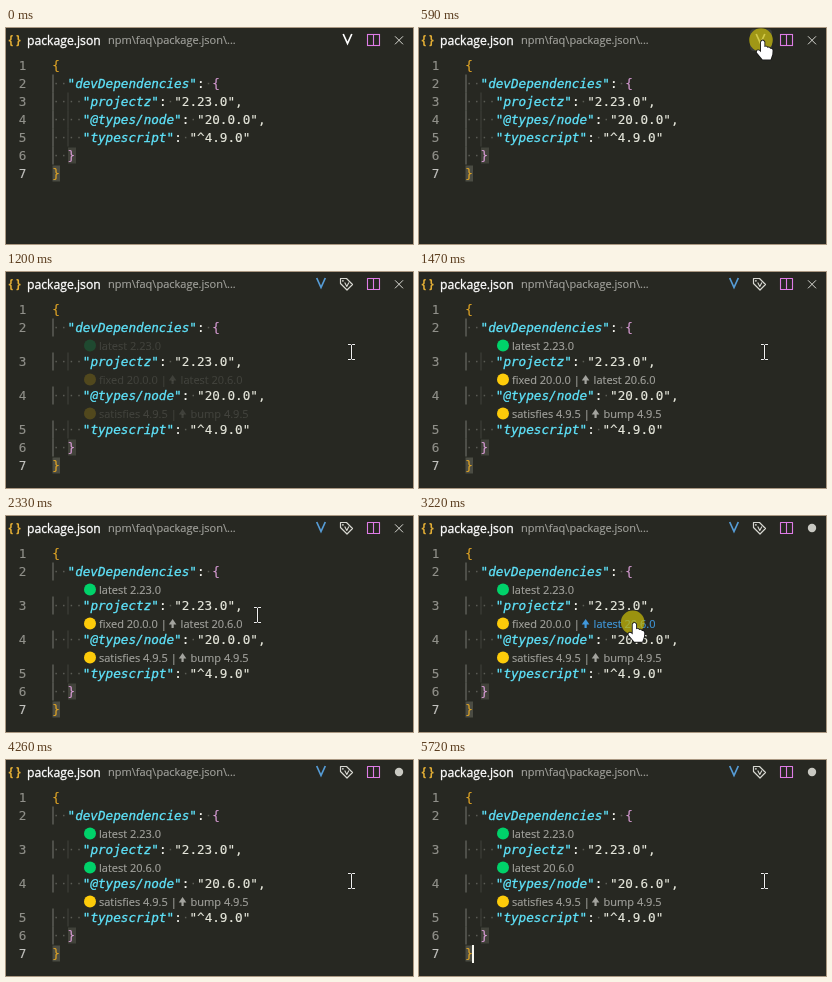
Recreate the animation shown at these times as an HTML page with a canvas. Size 407 px wide and 216 px high, loop 6.04 s.

```html
<!DOCTYPE html>
<html lang="en">
<head>
<meta charset="utf-8">
<title>Dependency versions in an editor</title>
<style>
html, body { margin: 0; width: 100%; height: 100%; overflow: hidden; background: #272822; }
canvas { display: block; width: 407px; height: 216px; }
</style>
</head>
<body>
<canvas id="stage"></canvas>
<script>
const W = 407, H = 216, LOOP = 6040;
const canvas = document.getElementById('stage');
const ctx = canvas.getContext('2d');
const scale = window.devicePixelRatio || 1;
canvas.width = W * scale;
canvas.height = H * scale;

const UI = '"Open Sans", "Noto Sans", sans-serif';
const MONO = '12.65px "DejaVu Sans Mono", monospace';
const LEFT = 46.3, COL = 7.617;
const C = {
  bg: '#272822', key: '#5fe3fb', value: '#e6e7dc', plain: '#f8f8f2', dim: '#a3a39e',
  gold: '#e0a526', orchid: '#d59ad2', dot: '#5b5c55', guide: '#767771', link: '#4098dc',
  green: '#00d26a', yellow: '#fdcb0a', split: '#de7ce6', icon: '#d8d8d2'
};

// Event times in ms
const TOGGLED = 730, SHIFTED = 1060, LENS_IN = 1135, LENS_FULL = 1470;
const EDITED = 3220, LENS_NEW = 3620;
const CLICKS = [[530, 670], [EDITED, 3290]];
const CARET_ON = [[730, 1200], [1700, 2200], [2740, 3220], [3750, 4260], [4730, 5250], [5720, LOOP]];
const within = (t, spans) => spans.some(([a, b]) => t >= a && t < b);

// Pointer moves: start, end, destination, ease-out power
const MOVES = [
  [70, 500, 342, 12, 1.5],
  [670, 1060, 345, 79.5, 2],
  [1940, 2600, 213.7, 106.3, 1.35],
  [3620, 4130, 344.5, 121, 1.5]
];

function pointerAt(t) {
  const step = Math.floor((t + 15) / 66.9) * 66.9;
  let x = 362, y = 194;
  for (const [a, b, tx, ty, power] of MOVES) {
    const u = Math.min(1, Math.max(0, (step - a) / (b - a)));
    const k = 1 - Math.pow(1 - u, power);
    x += (tx - x) * k;
    y += (ty - y) * k;
  }
  return { x, y };
}

// A non-zero weight thickens the glyphs slightly
function text(str, x, y, font, color, weight = 0) {
  ctx.font = font;
  ctx.fillStyle = color;
  ctx.fillText(str, x, y);
  if (weight) {
    ctx.strokeStyle = color;
    ctx.lineWidth = weight;
    ctx.strokeText(str, x, y);
  }
  return x + ctx.measureText(str).width;
}

function disc(x, y, r, color) {
  ctx.fillStyle = color;
  ctx.beginPath();
  ctx.arc(x, y, r, 0, Math.PI * 2);
  ctx.fill();
}

function rect(x, y, w, h, color) {
  ctx.fillStyle = color;
  ctx.fillRect(x, y, w, h);
}

function line(points, color, width = 1, close = false) {
  ctx.strokeStyle = color;
  ctx.lineWidth = width;
  ctx.beginPath();
  points.forEach(([x, y]) => ctx.lineTo(x, y));
  if (close) ctx.closePath();
  ctx.stroke();
}

const code = (str, col, y, color, italic) =>
  text(str, LEFT + col * COL, y + 4.5, (italic ? 'italic ' : '') + MONO, color, italic ? 0.3 : 0.15);

function spaceDots(from, to, y) {
  for (let c = from; c < to; c++) rect(LEFT + (c + 0.5) * COL - 0.7, y - 0.7, 1.5, 1.5, C.dot);
}

function entry(key, value, y) {
  const name = `"${key}"`, mid = 4 + name.length;
  spaceDots(0, 4, y);
  code(name, 4, y, C.key, true);
  code(':', mid, y, C.plain);
  spaceDots(mid + 1, mid + 2, y);
  code(value, mid + 2, y, C.value);
}

function drawTabs() {
  const brace = `bold 12px ${UI}`;
  text('{', 2.5, 15.5, brace, '#e3ae35');
  text('}', 10, 15.5, brace, '#e3ae35');
  text('package.json', 21, 16.5, `12.2px ${UI}`, '#ffffff', 0.3);
  text('npm\\faq\\package.json\\...', 102, 16, `11px ${UI}`, C.dim, 0.15);
}

function drawTag(x, y) {
  ctx.lineJoin = 'round';
  line([[x - 6, y - 5.5], [x, y - 5.5], [x + 6, y + 0.5], [x + 0.5, y + 6], [x - 6, y - 0.5]], C.icon, 1.2, true);
  disc(x - 3.6, y - 3.2, 0.9, C.icon);
  line([[x - 1.8, y - 1.5], [x + 0.3, y + 2.4], [x + 2.4, y - 1.5]], C.icon, 1.1);
}

function drawToolbar(t, p) {
  const on = t >= TOGGLED;
  if (t >= 70 && p.y < 23 && Math.abs(p.x - 342) < 12) {
    ctx.fillStyle = 'rgba(90,93,94,0.4)';
    ctx.beginPath();
    ctx.roundRect(331, 1, 22, 22, 4);
    ctx.fill();
  }
  const vx = on ? 315 : 341.5;
  ctx.lineJoin = 'miter';
  line([[vx - 4.3, 6], [vx, 15.5], [vx + 4.3, 6]], on ? '#569cd6' : '#ffffff', 1.7);
  if (on) drawTag(340.5, 12);

  ctx.strokeStyle = C.split;
  ctx.lineWidth = 1.1;
  ctx.strokeRect(361.5, 6.5, 12, 11);
  line([[367.5, 6.5], [367.5, 17.5]], C.split, 1.1);

  if (t >= EDITED) {
    disc(393, 12, 4.2, '#c9c9c2');
  } else {
    line([[389, 8.3], [397, 16.3]], C.icon, 1);
    line([[389, 16.3], [397, 8.3]], C.icon, 1);
  }
}

function lens(y, color, label, action, hover) {
  const font = `11px ${UI}`;
  disc(84, y, 6, color);
  const end = text(label + (action ? ' | ' : ''), 93, y + 4, font, C.dim, 0.15);
  if (!action) return;
  const tint = hover ? C.link : C.dim;
  const ax = end + 3;
  ctx.fillStyle = tint;
  ctx.beginPath();
  ctx.moveTo(ax, y - 4.5);
  ctx.lineTo(ax + 3.8, y + 1);
  ctx.lineTo(ax - 3.8, y + 1);
  ctx.fill();
  rect(ax - 1.1, y + 0.5, 2.2, 4, tint);
  text(action, end + 11, y + 4, font, tint, 0.15);
}

function drawEditor(t, hover) {
  const gap = t >= SHIFTED ? 16 : 0;
  const rows = [0, 1, 2, 3, 4, 5, 6].map(i => 37.5 + i * 18 + gap * Math.min(3, Math.max(0, i - 1)));

  rows.forEach((y, i) => {
    code(String(i + 1), -4.4, y, i === 6 ? '#c2c2bf' : '#90908a');
    if (i > 0 && i < 6) rect(46.5, y - 9, 1, 18, C.guide);
    if (i > 1 && i < 5) rect(61.5, y - 9, 1, 18, '#42433c');
  });

  rect(62, rows[5] - 8, 8, 16, '#41423a');
  rect(46.5, rows[6] - 8, 7.5, 16, '#4b4c43');

  code('{', 0, rows[0], C.gold);
  spaceDots(0, 2, rows[1]);
  code('"devDependencies"', 2, rows[1], C.key, true);
  code(':', 19, rows[1], C.plain);
  spaceDots(20, 21, rows[1]);
  code('{', 21, rows[1], C.orchid);
  entry('projectz', '"2.23.0",', rows[2]);
  entry('@types/node', t >= EDITED ? '"20.6.0",' : '"20.0.0",', rows[3]);
  entry('typescript', '"^4.9.0"', rows[4]);
  spaceDots(0, 2, rows[5]);
  code('}', 2, rows[5], C.orchid);
  code('}', 0, rows[6], C.gold);

  if (t >= LENS_IN) {
    ctx.globalAlpha = Math.min(1, (t - LENS_IN) / (LENS_FULL - LENS_IN));
    lens(73.5, C.green, 'latest 2.23.0');
    if (t < LENS_NEW) lens(107.5, C.yellow, 'fixed 20.0.0', 'latest 20.6.0', hover);
    else lens(107.5, C.green, 'latest 20.6.0');
    lens(141.5, C.yellow, 'satisfies 4.9.5', 'bump 4.9.5');
    ctx.globalAlpha = 1;
  }

  if (within(t, CARET_ON)) rect(53, rows[6] - 8.5, 2, 18, '#f8f8f0');
}

function drawIBeam(x, y) {
  const cx = Math.round(x) + 0.5, cy = Math.round(y);
  const bars = (color, width) => {
    line([[cx, cy - 7], [cx, cy + 7]], color, width);
    for (const s of [-1, 1]) line([[cx - 3.5, cy + s * 7.5], [cx - 0.7, cy + s * 7.5], [cx, cy + s * 6.5],
      [cx + 0.7, cy + s * 7.5], [cx + 3.5, cy + s * 7.5]], color, width);
  };
  bars('rgba(0,0,0,0.3)', 2);
  bars('#f0f0f0', 1);
}

function drawHand(x, y) {
  ctx.save();
  ctx.translate(x, y);
  ctx.beginPath();
  ctx.moveTo(0, 2);
  ctx.quadraticCurveTo(1.7, -1, 3.4, 2);
  ctx.lineTo(3.4, 7);
  ctx.quadraticCurveTo(5.5, 5.8, 6.4, 7.7);
  ctx.quadraticCurveTo(8.4, 6.8, 9.2, 8.8);
  ctx.quadraticCurveTo(11.6, 8.2, 11.6, 10.6);
  ctx.lineTo(11.3, 14.5);
  ctx.lineTo(9.6, 19.5);
  ctx.lineTo(1.6, 19.5);
  ctx.lineTo(-4.2, 12.4);
  ctx.quadraticCurveTo(-4.4, 9.6, -1.8, 10.6);
  ctx.lineTo(0, 12.3);
  ctx.closePath();
  ctx.lineJoin = 'round';
  ctx.strokeStyle = '#1a1a1a';
  ctx.lineWidth = 1.8;
  ctx.stroke();
  ctx.fillStyle = '#ffffff';
  ctx.fill();
  ctx.restore();
}

function draw(t) {
  const p = pointerAt(t);
  const hover = t >= LENS_FULL && t < LENS_NEW && p.x < 238 && p.y > 99;
  ctx.setTransform(scale, 0, 0, scale, 0, 0);
  rect(0, 0, W, H, C.bg);
  drawTabs();
  drawToolbar(t, p);
  drawEditor(t, hover);
  if (t < 70) return;
  if (within(t, CLICKS)) disc(p.x, p.y, 11.8, 'rgba(196,184,10,0.74)');
  if (hover || p.y < 23) drawHand(p.x, p.y);
  else drawIBeam(p.x, p.y);
}

const start = performance.now();
function tick() {
  draw((performance.now() - start) % LOOP);
  requestAnimationFrame(tick);
}
tick();
</script>
</body>
</html>
```
